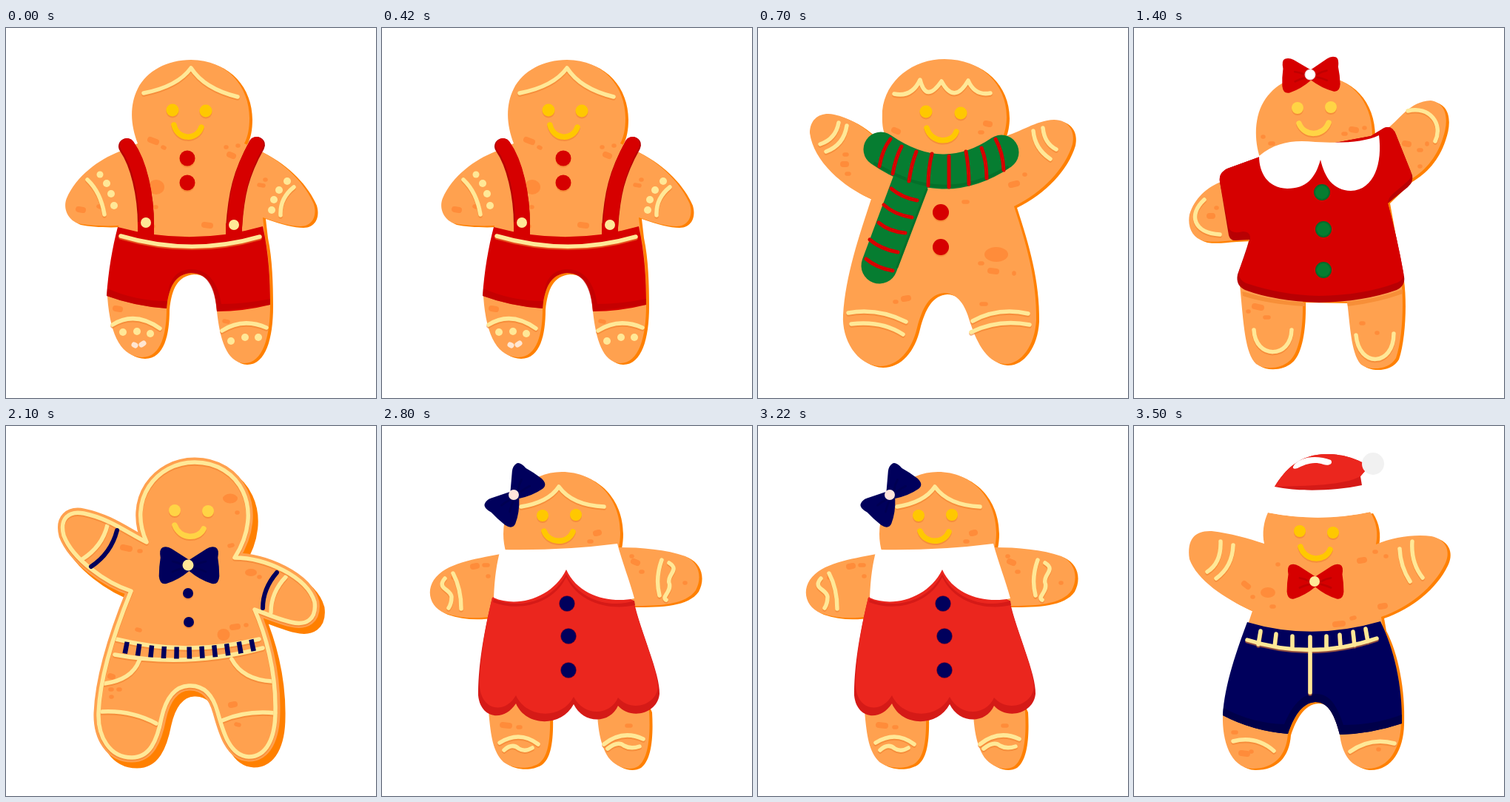
Write an HTML page without scripts that moves like this. It is 500x500 px and loops after 4200 ms.

```html
<!DOCTYPE html>
<html lang="en">
<head>
<meta charset="utf-8">
<title>Gingerbread cookies</title>
<style>
html, body { margin: 0; width: 100%; height: 100%; overflow: hidden; background: #fff; }
svg { display: block; width: 100%; height: 100%; }
.cookie { visibility: hidden; animation: show 4.2s calc(var(--i) * .7s - 4.2s) step-end infinite; }
@keyframes show {
  0% { visibility: visible; }
  16.666%, 100% { visibility: hidden; }
}
.edge { fill: #ff8000; transform: translate(4px, 2px); }
.dough { fill: #ffa14f; }
.line, .icing, .smile, .spots { fill: none; stroke-linecap: round; stroke-linejoin: round; }
.icing { stroke: #ffe897; stroke-width: 5.5; }
.icing, .face, .buttons { filter: drop-shadow(0 2px 0 #f0802f99); }
.face { fill: #ffc800; stroke: #ffc800; }
.pale { fill: #ffd445; stroke: #ffd445; }
.face circle { stroke: none; }
.smile { stroke-width: 7.5; }
.spots { stroke: #ff8c3a; stroke-width: 8; }
.small { stroke-width: 5.5; }
.spot { fill: #ff8c3a; }
.cream { fill: #ffe897; }
.red { fill: #d60000; }
.darkred { fill: #b80003; }
.bright { fill: #eb261e; }
.scarlet { fill: #d51a17; }
.green { fill: #067d31; }
.navy { fill: #00005c; }
.white { fill: #fff; }
</style>
</head>
<body>
<svg viewBox="0 0 500 500">
<defs>
  <g id="bow">
    <path id="wing" d="M0-7L-23-22Q-29-26-35-24Q-40-22-38-10Q-40 2-40 15Q-39 27-30 25Q-14 20 0 8Z"/>
    <use href="#wing" transform="scale(-1 1)"/>
    <path d="M-8 0Q-15-4-22-5M-8 4Q-16 6-22 9M8 0Q15-4 22-5M8 4Q16 6 22 9" fill="none" stroke="#000" stroke-opacity=".1" stroke-width="3" stroke-linecap="round"/>
  </g>
  <path id="body0" d="M178 156C168 130 167 104 178 82C190 58 218 43 250 43C300 43 329 80 329 122C329 135 327 147 322 156L345 167C380 185 405 212 416 238C421 255 413 268 398 268C385 268 370 264 347 256L350 282C356 310 357 345 357 374C357 418 347 453 322 453C298 452 289 420 285 383C283 350 273 331 250 331C228 333 220 350 217 379C217 412 210 445 184 445C158 444 141 420 137 363L152 267C135 268 110 267 97 264C82 258 77 242 82 230C95 200 125 178 153 167Z"/>
  <path id="body1" d="M172 145C167 135 168 122 168 112C172 70 210 42 252 42C302 42 336 76 336 120C336 130 334 140 331 147C355 141 375 125 400 124C420 124 429 140 425 157C415 190 385 222 346 241C362 290 377 340 376 395C374 430 355 455 333 454C307 452 294 420 286 396C280 374 270 359 252 358C232 359 222 378 215 405C208 435 190 457 165 457C133 456 113 420 115 388C118 335 137 280 153 231C115 215 75 180 70 142C70 122 85 113 103 117C125 122 140 132 155 145Z"/>
  <path id="body2" d="M172 180C162 155 162 122 175 100C190 75 215 64 245 64C292 64 322 98 322 145L340 138C358 125 372 99 401 98C425 102 425 128 417 150C408 177 392 194 372 206L342 235L361 340C365 370 363 420 354 446C345 462 318 464 306 454C293 438 292 400 288 370L228 369C229 410 222 440 210 450C198 461 176 462 165 454C150 440 148 400 143 347L155 286L135 287C120 288 108 290 95 288C78 284 72 268 75 252C82 230 98 215 120 207Z"/>
  <path id="body3" d="M190 157C164 100 203 49 255 49C315 49 351 112 309 178C350 178 407 203 417 238C420 262 405 270 385 265C368 261 354 255 336 248C350 280 365 330 364 385C364 422 352 447 328 447C302 446 293 412 286 387C279 361 265 350 247 351C225 352 215 373 210 395C204 426 194 448 170 448C140 448 124 420 125 388C127 335 149 272 169 223C135 212 90 180 78 148C72 125 85 114 105 118C140 125 165 145 190 157Z"/>
  <path id="body4" d="M168 172C158 140 168 108 185 88C202 70 222 62 243 62C295 62 331 108 320 164C350 164 385 167 410 176C429 185 433 205 424 222C410 242 375 243 338 243L350 360L361 385C363 420 360 450 346 460C334 467 316 461 306 448C294 430 292 405 291 390L290 360H228L227 390C228 425 224 448 212 456C198 465 176 463 164 454C150 440 147 420 144 385L150 257C128 261 105 260 85 253C66 245 59 225 70 208C86 185 125 180 160 173Z"/>
  <path id="body5" d="M176 159C173 145 175 130 181 117Q252 131 319 116C328 130 330 145 327 160C350 150 380 146 402 149C424 154 428 172 420 187C405 218 372 245 334 258L337 275C353 305 363 355 361 402C360 435 345 464 314 463C290 460 281 440 278 417C270 385 260 373 245 373C226 374 215 395 208 416C206 445 190 463 160 463C130 462 119 425 120 391L155 265L160 250C122 233 85 208 75 180C71 152 83 141 105 142C130 145 155 152 176 159Z"/>
</defs>

<g class="cookie" style="--i:0">
  <use href="#body0" class="edge"/><use href="#body0" class="dough"/>
  <path class="spots" d="M195 151l8 3M98 245l6 1M268 266l8 1M148 379l6 1M302 171l5 2"/>
  <path class="spots small" d="M212 161l2 1M297 161h1M313 159h1M201 242h2M198 268h1M342 212l6 1M350 205h1M125 241l2 1M295 396l5 1"/>
  <ellipse class="spot" cx="203" cy="215" rx="11" ry="10"/>
  <path class="red" d="M151 269Q250 296 347 268C355 304 357 340 357 374Q321 383 285 383C283 350 273 331 250 331C228 333 220 350 217 379Q174 376 136 362C138 330 144 295 151 269Z"/>
  <path class="darkred" d="M137 352Q175 369 218 369L217 379Q174 376 136 362ZM219 363C224 343 232 332 250 331C270 331 282 348 285 383L357 374V366Q322 373 291 373C286 340 270 325 248 326C227 328 219 345 219 363Z" opacity=".55"/>
  <g class="line" stroke-width="22">
    <path d="M163 160C179 183 189 225 189 267M339 158C317 197 311 225 308 270" stroke="#b80003"/>
    <path d="M164 159C181 183 190 225 190 267M338 157C317 197 311 225 309 269" stroke="#d60000" stroke-width="20"/>
  </g>
  <path class="red" d="M178 262h22v22h-22zM297 264h22v20h-22z"/>
  <path class="icing" d="M186 88Q232 79 250 54Q268 82 313 93M155 281Q250 309 343 282M110 205Q128 222 133 252M389 215Q370 230 371 253M144 401Q174 382 208 406M292 409Q320 391 352 405"/>
  <g class="cream">
    <circle cx="189" cy="263" r="7"/><circle cx="308" cy="266" r="7"/>
    <circle cx="127" cy="198" r="4.5"/><circle cx="136" cy="210" r="5"/><circle cx="142" cy="224" r="5"/><circle cx="146" cy="240" r="5"/>
    <circle cx="380" cy="207" r="5"/><circle cx="369" cy="219" r="5"/><circle cx="362" cy="232" r="5"/><circle cx="359" cy="246" r="5"/>
    <circle cx="158" cy="411" r="5"/><circle cx="177" cy="410" r="5"/><circle cx="195" cy="413" r="5"/>
    <circle cx="304" cy="423" r="5"/><circle cx="323" cy="418" r="5"/><circle cx="341" cy="418" r="5"/>
  </g>
  <path class="line" d="M173 428l2 1M183 428l3-2" stroke="#ffe6d2" stroke-width="7"/>
  <g class="face"><circle cx="225" cy="111" r="8.5"/><circle cx="270" cy="112" r="8.5"/><path class="smile" d="M227 131C232 152 258 152 264 134"/></g>
  <g class="buttons red"><circle cx="245" cy="176" r="10.5"/><circle cx="245" cy="209" r="10.5"/></g>
</g>

<g class="cookie" style="--i:1">
  <use href="#body1" class="edge"/><use href="#body1" class="dough"/>
  <ellipse class="spot" cx="322" cy="306" rx="16" ry="10"/>
  <path class="spots" d="M115 184h4M308 129l5 1M342 212l8-2M314 328l8 1M197 366l6-1M184 138l5 2"/>
  <path class="spots small" d="M117 171h3M120 197h3M278 235h5M300 318h3M346 331v1M185 370h2M360 198h1M302 373h6M300 141h3"/>
  <path class="line" d="M208 203L164 321" stroke="#067d31" stroke-width="49"/>
  <path class="line" d="M228 218L188 323" stroke="#04702a" stroke-width="3"/>
  <path class="line" d="M166 164Q250 222 329 168" stroke="#067d31" stroke-width="47"/>
  <path class="line" d="M158 183Q250 242 337 188" stroke="#04702a" stroke-width="4"/>
  <path class="line" stroke="#d60000" stroke-width="5" d="M179 150Q168 164 164 187M194 160Q186 175 182 197M214 167Q207 185 204 207M235 170Q230 190 230 213M258 173V215M281 167Q285 188 285 211M302 162Q309 180 309 203M321 150Q331 168 332 192M180 217Q194 229 215 233M170 239Q184 252 208 256M163 263Q177 275 199 277M151 286Q166 299 189 303M146 312Q160 324 182 328"/>
  <path class="icing" d="M184 89Q208 94 219 70Q227 102 248 72Q265 104 284 71Q293 92 314 88M109 128Q105 150 84 157M120 132Q116 158 92 167M372 139Q374 163 395 177M385 135Q387 156 403 164M122 385Q162 378 200 397M126 400Q167 395 196 414M290 396Q325 377 365 386M288 411Q325 393 367 401"/>
  <g class="face"><circle cx="227" cy="113" r="8.5"/><circle cx="274" cy="115" r="8.5"/><path class="smile" d="M228 135C234 156 262 157 268 140"/></g>
  <g class="buttons red"><circle cx="247" cy="249" r="11"/><circle cx="247" cy="296" r="11"/></g>
</g>

<g class="cookie" style="--i:2">
  <use href="#body2" class="edge"/><use href="#body2" class="dough"/>
  <path class="spots" d="M163 376l9 2M366 156l5 1M294 137l6 1M102 254h4"/>
  <path class="spots small" d="M154 383h1M177 391h5M385 165h3M396 156v1M386 187h1M311 135h1M174 147h1M184 156h4M307 399h3M328 412h1M283 143h3M111 243h1"/>
  <path d="M146 356Q190 369 231 371V376Q180 373 147 362ZM288 370Q330 366 363 353V359Q330 371 289 376Z" fill="#f78f38"/>
  <path class="darkred" d="M170 174L126 190Q114 196 116 208L128 280Q130 288 138 287L156 286Q149 308 140 333Q137 348 150 354Q190 369 250 371Q310 370 355 354Q367 348 365 336Q356 285 343 237L370 215Q378 208 376 199L354 144Q349 131 338 135L320 146Z"/>
  <path class="red" d="M170 174L126 190Q114 196 116 208L128 270Q132 279 147 275Q158 275 157 286Q150 308 142 328Q140 340 152 345Q200 361 250 362Q310 361 353 345Q366 341 364 330Q356 285 343 237Q343 230 350 224L370 207Q376 202 374 194L354 144Q349 131 338 135L320 146Z"/>
  <path class="white" d="M169 173C192 154 215 151 245 154C285 156 312 154 331 145C336 182 325 219 293 220C269 219 258 203 252 178C245 203 233 217 207 217C180 216 169 195 169 173Z"/>
  <use href="#bow" class="red" transform="translate(239 63) rotate(-2) scale(.98 .94)"/>
  <circle cx="238" cy="63" r="7" fill="#fff" stroke="#ead4d4"/>
  <path class="icing" d="M95 232C73 252 80 277 116 279M370 112C400 105 418 130 407 153M162 408C164 448 212 447 213 408M300 415C304 460 351 457 351 413"/>
  <g class="face pale"><circle cx="221" cy="108" r="8"/><circle cx="266" cy="107" r="8"/><path class="smile" d="M223 129C230 147 256 147 263 128"/></g>
  <g class="green" stroke="#056b2a" stroke-width="2"><circle cx="254" cy="222" r="10"/><circle cx="256" cy="272" r="10"/><circle cx="256" cy="327" r="10"/></g>
</g>

<g class="cookie" style="--i:3">
  <g stroke-width="13" stroke-linejoin="round">
    <use href="#body3" fill="#ff8000" stroke="#ff8000" transform="translate(7 8)"/>
    <use href="#body3" class="dough" stroke="#ffa14f"/>
  </g>
  <g class="spot"><ellipse cx="303" cy="98" rx="10" ry="6.5"/><ellipse cx="294" cy="282" rx="8.5" ry="8"/><ellipse cx="331" cy="198" rx="8" ry="5"/></g>
  <path class="spots" d="M158 164l9 2M306 272l7-1M304 377l5-1M141 338l3 1"/>
  <path class="spots small" d="M180 169h2M177 275l4 1M324 269h1M152 356h2M141 356h2M311 403l4 1M302 162l4-1M342 204h1M312 117h1M142 366h1"/>
  <path class="icing" d="M149 288Q245 312 342 288M147 309Q245 327 347 300M137 134Q130 163 103 180M378 204Q358 225 358 252M180 317Q170 343 133 348M305 315Q320 343 360 345M130 386Q170 384 203 402M292 398Q325 384 364 388"/>
  <use href="#body3" class="icing"/>
  <g class="line" stroke="#00005c">
    <path d="M150 141Q142 172 115 190M366 198Q347 220 347 246" stroke-width="6"/>
    <path d="M159 299Q245 316 339 295" stroke-width="16" stroke-dasharray="6.5 10.7" style="stroke-linecap:butt"/>
  </g>
  <use href="#bow" class="navy" transform="translate(247.5 188) scale(1.02 1)"/>
  <circle class="cream" cx="246" cy="188" r="7.5"/>
  <g class="face pale"><circle cx="228" cy="114" r="8"/><circle cx="273" cy="115" r="8"/><path class="smile" d="M228 134C235 153 260 154 267 139"/></g>
  <g class="buttons navy"><circle cx="246" cy="226" r="7"/><circle cx="247" cy="265" r="7"/></g>
</g>

<g class="cookie" style="--i:4">
  <use href="#body4" class="edge"/><use href="#body4" class="dough"/>
  <path class="spots" d="M123 190l5-1M340 183l5 2M289 145l4-1M163 404l9 1"/>
  <path class="spots small" d="M138 188h5M143 203h1M337 176h1M350 197h2M280 156h3M184 407h3M331 405h5M96 205h1M409 212h1"/>
  <path class="scarlet" d="M149 232C135 290 130 330 130 364C133 396 165 400 181 375C194 406 242 408 259 376C272 403 308 403 319 378C335 397 372 390 375 362C376 335 350 280 340 236L249 194Z"/>
  <path class="bright" d="M149 232C136 285 132 325 132 352C135 386 167 389 181 364C195 395 242 398 259 366C273 393 308 392 319 367C336 387 371 378 373 352C371 325 349 275 339 236L249 194Z"/>
  <path class="scarlet" d="M151 234C185 248 230 238 249 200C266 236 310 247 341 236L342 242C308 250 265 239 249 204C230 243 182 251 150 238Z"/>
  <path class="white" d="M160 167Q240 169 318 159C325 185 335 210 341 233C309 240 265 230 249 194C230 233 182 246 151 232C152 205 155 185 160 167Z"/>
  <path class="icing" d="M188 109Q225 103 239 82Q257 107 300 109M85 206C73 220 93 220 94 231Q94 240 90 246M96 199Q107 220 107 247M378 181Q369 206 375 229M388 185C403 194 385 201 388 212C392 224 377 231 384 235M159 428Q186 411 211 430M165 438Q176 428 185 436Q193 441 203 435M300 430Q325 410 353 423M305 436Q319 425 327 432Q336 437 348 433"/>
  <use href="#bow" class="navy" transform="translate(179 93) rotate(-52)"/>
  <circle cx="178" cy="93" r="7" fill="#ffe5dc"/>
  <g class="face"><circle cx="217" cy="121" r="8"/><circle cx="262" cy="120" r="8"/><path class="smile" d="M219 142C225 159 251 160 258 143"/></g>
  <g class="navy" stroke="#a30d18" stroke-opacity=".5"><circle cx="250" cy="240" r="10.5"/><circle cx="252" cy="284" r="10.5"/><circle cx="252" cy="330" r="10.5"/></g>
</g>

<g class="cookie" style="--i:5">
  <use href="#body5" class="edge"/><use href="#body5" class="dough"/>
  <path class="white" d="M174 112Q180 118 181 117Q252 131 325 115V104H174Z"/>
  <ellipse class="spot" cx="181" cy="225" rx="10" ry="7"/>
  <path class="spots" d="M149 213l5 4M272 268l10-1M333 244l6-1M145 442l8 1M305 182l6-1"/>
  <path class="spots small" d="M186 244h3M160 231h1M294 260l4-1M340 176h1M325 170h2M134 414h4M158 440h1M330 437h1M194 187h1"/>
  <path class="navy" d="M153 265Q240 291 333 264C351 300 363 350 362 402Q320 416 278 417C270 385 260 373 245 373C226 374 215 395 208 416Q160 412 120 391C122 350 140 300 153 265Z"/>
  <path d="M121 381Q160 402 203 403C215 375 228 362 246 362C266 362 275 380 283 404Q325 404 362 390V402Q320 416 278 417C270 385 260 373 245 373C226 374 215 395 208 416Q160 412 120 391Z" fill="#00004a"/>
  <path class="icing" d="M153 289Q240 317 328 287M171 277L168 295M192 281L190 298M214 284V301M238 285V360M260 284V300M278 282L279 298M296 278L298 296M313 274L316 291M117 156Q118 185 99 197M134 161Q133 190 111 206M359 166Q360 190 373 210M376 156Q374 185 390 205M134 426Q165 418 189 439M292 440Q320 420 352 429"/>
  <path class="scarlet" d="M190 82C204 59 224 38 260 38C287 38 303 46 318 54L306 68L308 80C270 88 222 89 190 82Z"/>
  <path class="bright" d="M190 82C204 59 224 38 260 38C287 38 303 46 318 54L306 68C285 80 235 81 190 82Z"/>
  <path class="white" d="M215 55C221 42 246 38 266 46C270 52 262 54 256 52C241 47 230 53 221 57Q214 59 215 55Z"/>
  <circle cx="323" cy="51" r="15" fill="#f1f1f1"/>
  <use href="#bow" class="red" transform="translate(245 210) scale(.96 .94)"/>
  <circle class="cream" cx="244" cy="210" r="7"/>
  <g class="face"><circle cx="224" cy="142" r="8"/><circle cx="269" cy="144" r="8"/><path class="smile" d="M225 163C231 183 258 184 265 167"/></g>
</g>
</svg>
</body>
</html>
```
